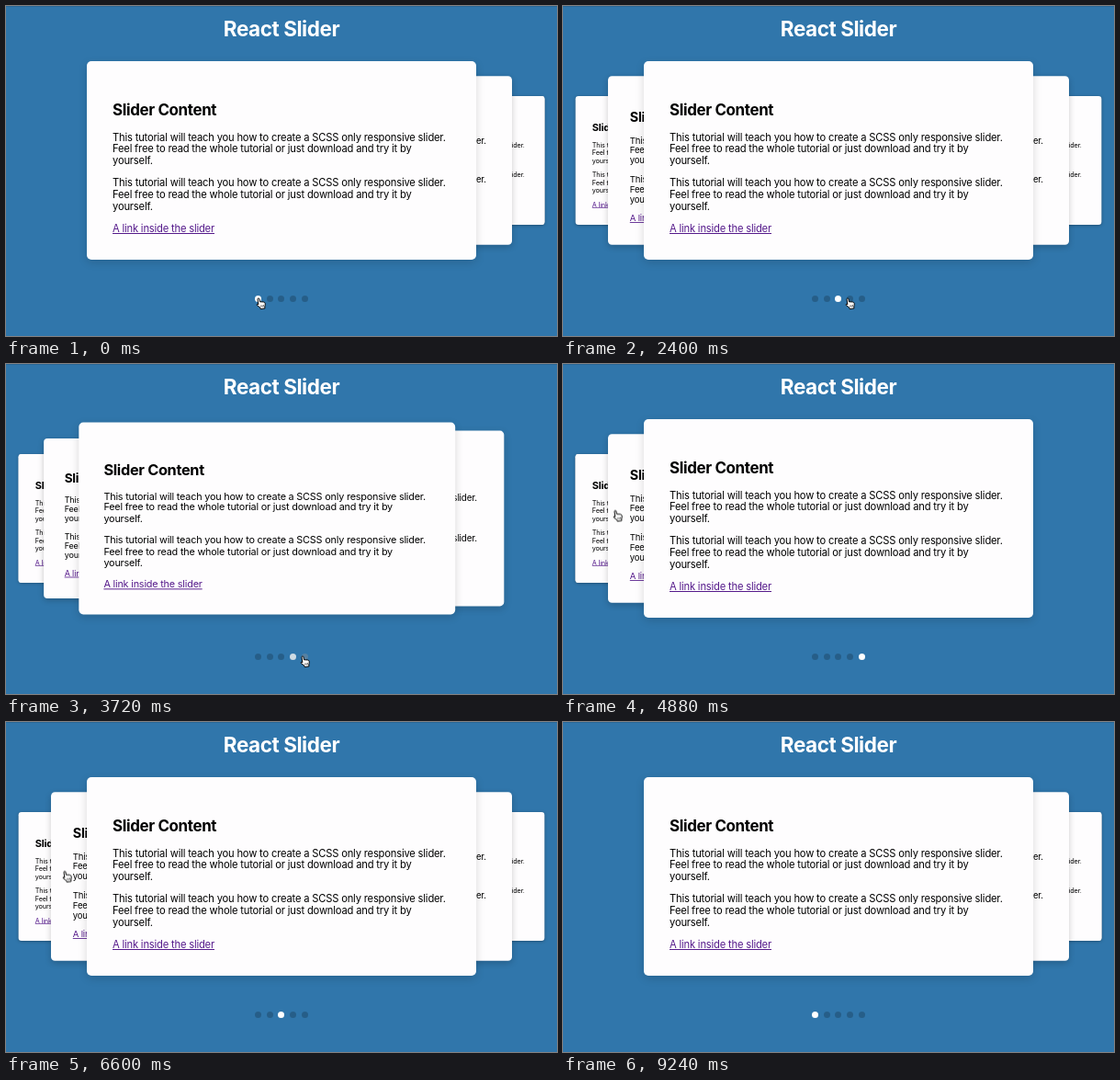
These frames come from a looping animation (600 px wide and 359 px high, 9280 ms). An HTML page:

```html
<!DOCTYPE html>
<html lang="en">
<head>
<meta charset="utf-8">
<title>React Slider</title>
<style>
  html, body { margin: 0; width: 100%; height: 100%; overflow: hidden; }
  body { position: relative; background: #3076ab; font: 11.2px/12.8px Inter, Roboto, sans-serif; letter-spacing: -.0168em; }
  body::before { content: ""; position: absolute; top: 0; left: 0; width: 100%; height: 1px; background: #2a6796; }
  h1, h2, p { margin: 0; white-space: nowrap; }
  h1 { position: absolute; left: 0; top: 10.8px; width: 600px; text-align: center; color: #fff; font: 700 22.5px/28px Inter, Roboto, sans-serif; letter-spacing: -.02em; }
  .card { position: absolute; left: 88px; top: 60px; width: 424px; height: 216px; box-sizing: border-box; padding: 42.8px 28px 0; border-radius: 5px; background: #fefdfe; color: #000; }
  h2 { margin-bottom: 13.8px; font: 700 16.9px/20px Inter, Roboto, sans-serif; letter-spacing: -.02em; }
  p { margin-bottom: 11.2px; }
  .link { color: #551a8b; text-decoration: underline; }
  .dot { position: absolute; top: 315.3px; width: 7px; height: 7px; border-radius: 50%; }
  #hand { position: absolute; left: 0; top: 0; width: 11px; height: 14px; z-index: 20; overflow: visible; }
</style>
</head>
<body>
<h1>React Slider</h1>
<svg id="hand" viewBox="0 0 11 14">
  <path transform="rotate(-9 5 7)" d="M2.8 1.7a1 1 0 0 1 2 0v3l3.8.8q1.6.4 1.6 2-.2 2-1 3.4v1.7H4.3v-1.4L1.1 7.9q-.4-1.2.8-1.2l.9.8z"
    fill="#fff" stroke="#000" stroke-width=".9" stroke-linejoin="round"/>
  <path transform="rotate(-9 5 7)" d="M5.4 8.6v2.2M6.8 8.6v2.2M8.2 8.6v2.2" stroke="#000" stroke-width=".5"/>
</svg>
<script>
const LOOP = 9280, SLIDE_TIME = 400, COUNT = 5;

// [time of click, card that becomes active]
const clicks = [[450, 1], [1450, 2], [2570, 3], [3654, 4], [5150, 3], [6000, 2], [6850, 1], [7704, 0]];

// Shift, scale and shadow by distance from the active card
const places = [
  { shift: 0, scale: 1, shadow: '0 3px 10px rgba(0, 0, 0, .15)' },
  { shift: 70.8, scale: .85, shadow: '0 3px 9px rgba(0, 0, 0, .2)' },
  { shift: 149, scale: .648, shadow: '0 1px 5px rgba(0, 0, 0, .35)' }
];
const noShadow = '0 1px 5px rgba(0, 0, 0, 0)';

const text = `<p>This tutorial will teach you how to create a SCSS only responsive slider.<br>
Feel free to read the whole tutorial or just download and try it by<br>yourself.</p>`;
const content = `<h2>Slider Content</h2>${text}${text}<p><span class="link">A link inside the slider</span></p>`;

function add(className, html = '') {
  const el = document.createElement('div');
  el.className = className;
  el.innerHTML = html;
  document.body.append(el);
  return el;
}

function play(el, frames) {
  el.animate(frames, { duration: LOOP, iterations: Infinity });
}

// Builds a hold-then-ease track from a pose that depends on the active card
function track(pose) {
  const frames = [];
  const key = (time, active) => frames.push({ offset: time / LOOP, easing: 'ease', ...pose(active) });
  let active = 0;
  key(0, active);
  for (const [time, next] of clicks) {
    key(time, active);
    key(time + SLIDE_TIME, next);
    active = next;
  }
  key(LOOP, active);
  return frames;
}

function cardPose(index, active) {
  const offset = index - active, distance = Math.abs(offset);
  const { shift, scale, shadow } = places[Math.min(distance, 2)];
  return {
    transform: `translateX(${Math.sign(offset) * shift}px) scale(${scale})`,
    zIndex: 10 - distance,
    boxShadow: distance > 2 ? noShadow : shadow
  };
}

for (let i = 0; i < COUNT; i++) {
  play(add('card', content), track(active => cardPose(i, active)));

  const dot = add('dot');
  dot.style.left = `${271 + i * 12.7}px`;
  play(dot, track(active => ({ backgroundColor: active === i ? '#fff' : 'rgba(0, 0, 0, .2)' })));
}

// Pointer stops: [time, x, y]
const stops = [
  [0, 272, 317], [120, 272, 317], [400, 284, 317], [1000, 284, 317], [1350, 296, 317],
  [1950, 296, 317], [2300, 307, 317], [3100, 307, 317], [3500, 320, 317], [3920, 320, 317],
  [4760, 54, 158.5], [4900, 54, 158.5], [5100, 61, 161.5], [LOOP, 61, 161.5]
];
const hand = document.getElementById('hand');
play(hand, stops.map(([time, x, y]) => ({
  offset: time / LOOP, easing: 'ease-in-out', transform: `translate(${x}px, ${y}px)`
})));
play(hand, [
  { offset: 0, opacity: 1, easing: 'step-end' },
  { offset: 8480 / LOOP, opacity: 0, easing: 'step-end' },
  { offset: 1, opacity: 0 }
]);
</script>
</body>
</html>
```
